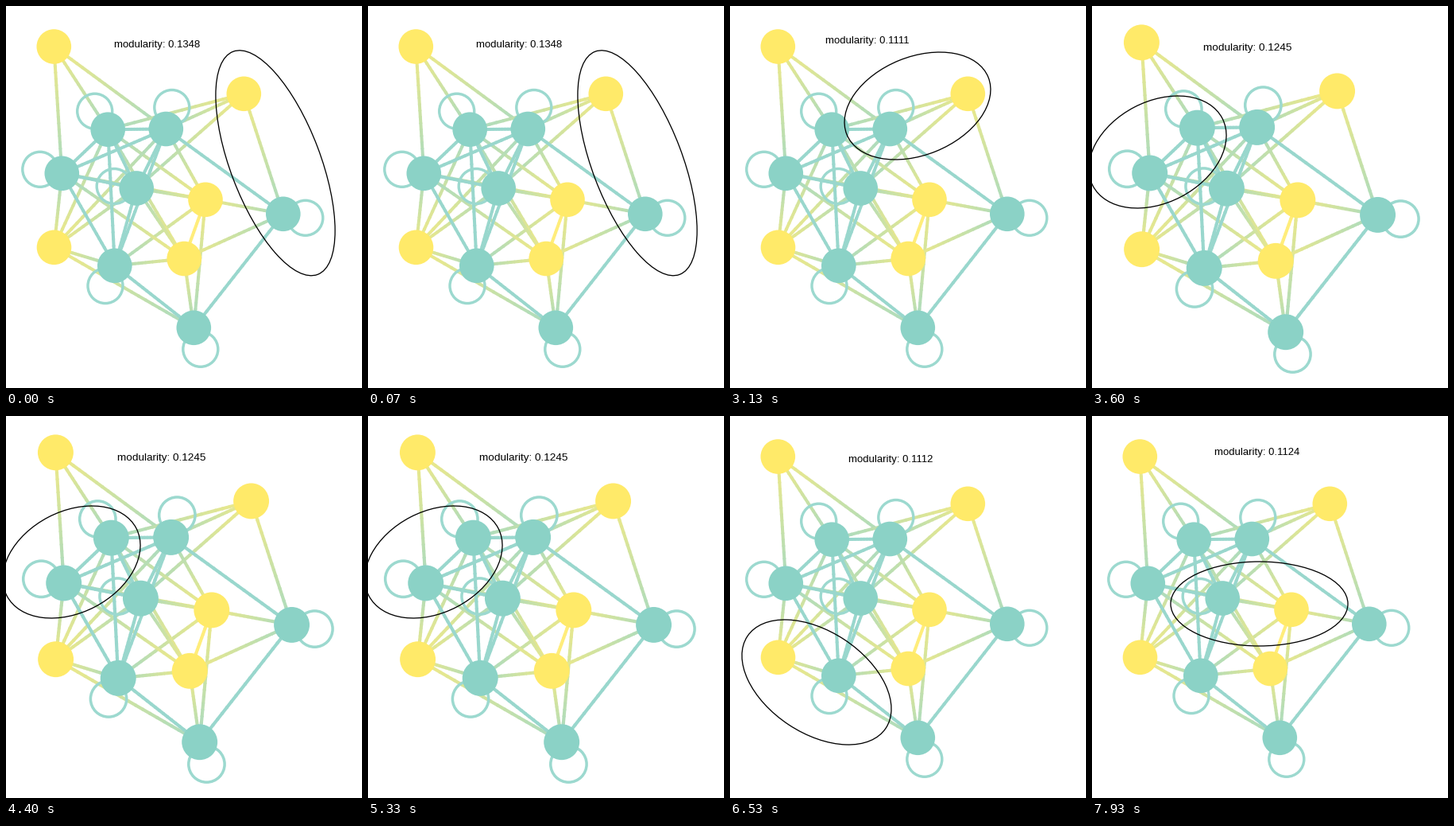
These frames come from a looping animation (448 by 480 pixels, 8000 ms). A matplotlib script:

```python
import matplotlib.pyplot as plt
import numpy as np
from matplotlib.animation import ArtistAnimation
from matplotlib.collections import LineCollection
from matplotlib.colors import to_rgb
from matplotlib.patches import Circle, Ellipse

W, H, DPI = 448, 480, 100
STEP_MS, STEPS = 200, 40
HOLD = 9  # steps per merge candidate
PX = 72 / DPI

TEAL = np.array(to_rgb("#8bd2c6"))
YELLOW = np.array(to_rgb("#ffea69"))

# name: (x, y, self-loop offset)
NODES = {
    "y1": (60.3, 51, None), "y2": (299.3, 110.3, None),
    "y3": (251, 243.3, None), "y4": (60.5, 303.3, None),
    "y5": (224.2, 317.5, None),
    "t1": (128.2, 155.2, (-16.5, -23)), "t2": (201.3, 154.5, (7.5, -27)),
    "t3": (70.3, 210.3, (-27.5, -5)), "t4": (164.2, 229, (-28, -2.5)),
    "t5": (348.8, 261.3, (28, 5)), "t6": (136.8, 326.3, (-11.8, 25.3)),
    "t7": (236.3, 404.3, (8.5, 27)),
}

LINKS = {
    "y1": "t1 t2 t3",
    "y2": "t1 t2 t4 t5",
    "y3": "t1 t2 t3 t4 t5 t6 t7 y5",
    "y4": "t1 t2 t3 t4 t6 t7",
    "y5": "t1 t3 t4 t5 t6 t7",
    "t1": "t2 t3 t4 t6",
    "t2": "t3 t4 t5 t6",
    "t3": "t4 t6",
    "t4": "t6",
    "t5": "t7",
    "t6": "t7",
}

# score, text position, ellipse (cx, cy, a, b, angle), zoomed view
SHOTS = [
    ("0.1348", (136, 52), (339, 197.3, 149.8, 56.7, 69.2), False),
    ("0.1111", (120.3, 47.5), (236, 125.5, 96, 61.6, -22), False),
    ("0.1245", (140, 56.3), (82.5, 183.5, 91.8, 63.5, -27.5), True),
    ("0.1112", (149, 58), (109, 334.5, 104.5, 63.9, 33.5), False),
    ("0.1124", (154, 48.5), (210.5, 236, 111.5, 53, 0), False),
]
ZOOM, SHIFT = 1.03, np.array([0.3, -6.7])

fig = plt.figure(figsize=(W / DPI, H / DPI), dpi=DPI, facecolor="white")
ax = fig.add_axes([0, 0, 1, 1])
ax.set_xlim(0, W)
ax.set_ylim(H, 0)
ax.axis("off")


def fade(color, alpha):
    return 1 - alpha * (1 - color)


def hue(name):
    return YELLOW if name[0] == "y" else TEAL


def edge(p, q, c0, c1, width, parts=20):
    t = np.linspace(0, 1, parts + 1)
    ends = np.minimum(t[1:] + 0.01, 1)
    segs = [(p + (q - p) * a, p + (q - p) * b) for a, b in zip(t[:-1], ends)]
    mix = np.linspace(0.15, 0.85, parts)[:, None]
    colors = fade(c0 + (c1 - c0) * mix, 0.88)
    return ax.add_collection(
        LineCollection(segs, colors=colors, linewidths=width * PX, zorder=1),
        autolim=False)


def draw_graph(scale, shift):
    def place(x, y):
        return np.array([x, y]) * scale + shift

    pos = {n: place(x, y) for n, (x, y, _) in NODES.items()}
    art = []
    for a, targets in LINKS.items():
        for b in targets.split():
            art.append(edge(pos[a], pos[b], hue(a), hue(b), 4 * scale))
    for n, (x, y, loop) in NODES.items():
        if loop:
            center = place(x + loop[0], y + loop[1])
            art.append(ax.add_patch(Circle(
                center, 22 * scale, fill=False, ec=fade(TEAL, 0.85),
                lw=3.4 * scale * PX, zorder=2)))
        art.append(ax.add_patch(Circle(
            pos[n], 21.8 * scale, fc=hue(n), lw=0, zorder=3)))
    return art


def draw_shot(score, at, oval, zoomed):
    cx, cy, a, b, angle = oval
    size = 13.1 * (ZOOM if zoomed else 1)
    label = ax.text(*at, f"modularity: {score}", family="Liberation Sans",
                    size=size * PX, color="black", va="baseline", zorder=5)
    ring = ax.add_patch(Ellipse((cx, cy), 2 * a, 2 * b, angle=angle, fill=False,
                                ec="black", lw=1.3 * PX, zorder=4))
    return [label, ring]


views = {False: draw_graph(1, np.zeros(2)), True: draw_graph(ZOOM, SHIFT)}
scenes = [views[shot[3]] + draw_shot(*shot) for shot in SHOTS]
frames = [scenes[i // HOLD] for i in range(STEPS)]

anim = ArtistAnimation(fig, frames, interval=STEP_MS, repeat=True,
                       repeat_delay=0, blit=False)
plt.show()
```
